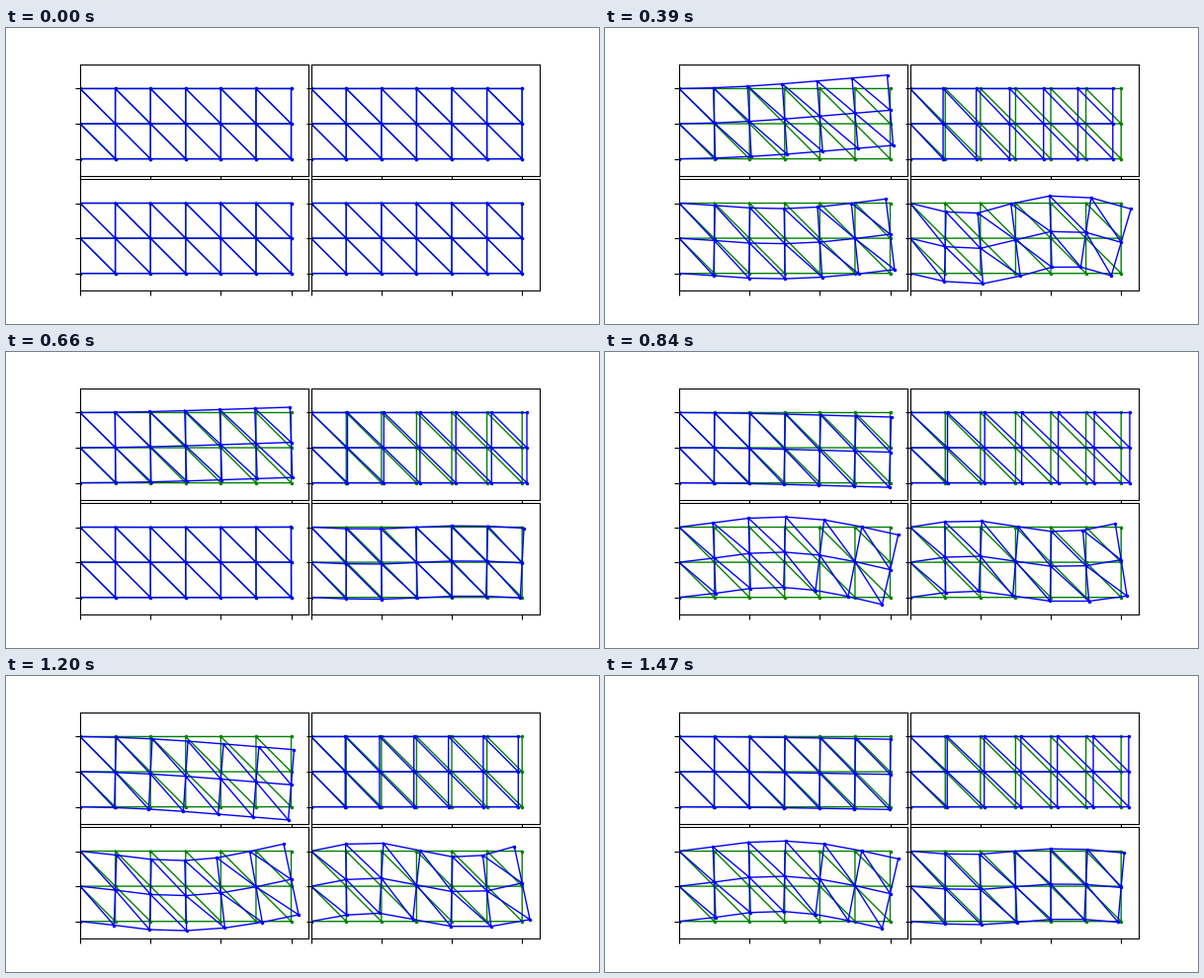
Recreate the animation shown at these times as a matplotlib script. Size 600 by 300 pixels, loop 1500 ms.

```python
import numpy as np
import matplotlib.pyplot as plt
from matplotlib.animation import FuncAnimation

FRAMES, INTERVAL = 50, 30
COLS, ROWS = 7, 3
CELL = 35.6  # mode shapes below are given in pixels, one cell is this wide

col, row = (a.ravel() for a in np.meshgrid(range(COLS), range(ROWS)))
rest = np.column_stack([col, row]).astype(float)


def truss_edges():
    """Node index pairs for the horizontal, vertical and diagonal bars."""
    node = lambda i, j: j * COLS + i
    edges = []
    for j in range(ROWS):
        for i in range(COLS):
            if i + 1 < COLS:
                edges.append((node(i, j), node(i + 1, j)))
            if j + 1 < ROWS:
                edges.append((node(i, j), node(i, j + 1)))
            if i + 1 < COLS and j > 0:
                edges.append((node(i, j), node(i + 1, j - 1)))
    return edges


EDGES = np.array(truss_edges())


def bars(points):
    """Segments separated by NaN rows, so one line draws the whole truss."""
    seg = np.full((len(EDGES), 3, 2), np.nan)
    seg[:, :2] = points[EDGES]
    return seg.reshape(-1, 2).T


def mode(lift, turn, skew=np.zeros(COLS), stretch=np.zeros(COLS)):
    """Displacement field from per-column lift, rotation, skew and stretch."""
    lift, turn, skew, stretch = map(np.asarray, (lift, turn, skew, stretch))
    dx = stretch[col] + turn[col] * (row - 1)
    dy = lift[col] + skew[col] * (row - 1)
    return np.column_stack([dx, dy]) / CELL


still = np.zeros(COLS)
x = np.arange(COLS)

# (angular step per frame, shape)
MODES = [
    (0.1242, mode([0, 0.8, 2.4, 4.8, 7.7, 10.7, 13.7],
                  [0, -1.0, -1.8, -2.4, -2.8, -3.0, -3.0])),
    (0.3055, mode(still, still, stretch=11.4 * np.sin(np.pi * x / 12))),
    (0.2850, mode([0, 4.3, 9.1, 10.3, 7.3, 0.6, -7.6],
                  [0, -1.4, -1.0, 1.0, 4.4, 6.9, 8.2],
                  [0, 0.1, 0, 0.1, 0.1, -0.3, -0.3])),
    (0.1347, mode([0, -8.7, -10.4, -1.7, 6.9, 6.0, -4.2],
                  [0, 0.8, -2.6, -4.8, -1.1, 5.3, 10.1],
                  [0, -0.4, 0.2, 1.0, 0.5, -0.5, -1.8])),
]


def draw_truss(ax, color):
    lines, = ax.plot(*bars(rest), color=color, lw=1)
    dots, = ax.plot(*rest.T, ".", color=color, ms=3)
    return lines, dots


fig, axes = plt.subplots(2, 2, figsize=(6, 3), dpi=100)
fig.subplots_adjust(left=0.125, right=0.9, bottom=0.11, top=0.88,
                    wspace=0.01, hspace=0.01)

moving = []
for ax in axes.flat:
    ax.set(xlim=(0, 6.5), ylim=(-0.5, 2.7), aspect="equal",
           xticks=[0, 2, 4, 6], yticks=[0, 1, 2])
    ax.tick_params(labelbottom=False, labelleft=False)
    draw_truss(ax, "g")
    moving.append(draw_truss(ax, "b"))


def update(n):
    for (step, shape), (lines, dots) in zip(MODES, moving):
        points = rest + np.sin(step * n) * shape
        lines.set_data(*bars(points))
        dots.set_data(*points.T)
    return [artist for pair in moving for artist in pair]


anim = FuncAnimation(fig, update, frames=FRAMES, interval=INTERVAL,
                     repeat=True, repeat_delay=0)
plt.show()
```
